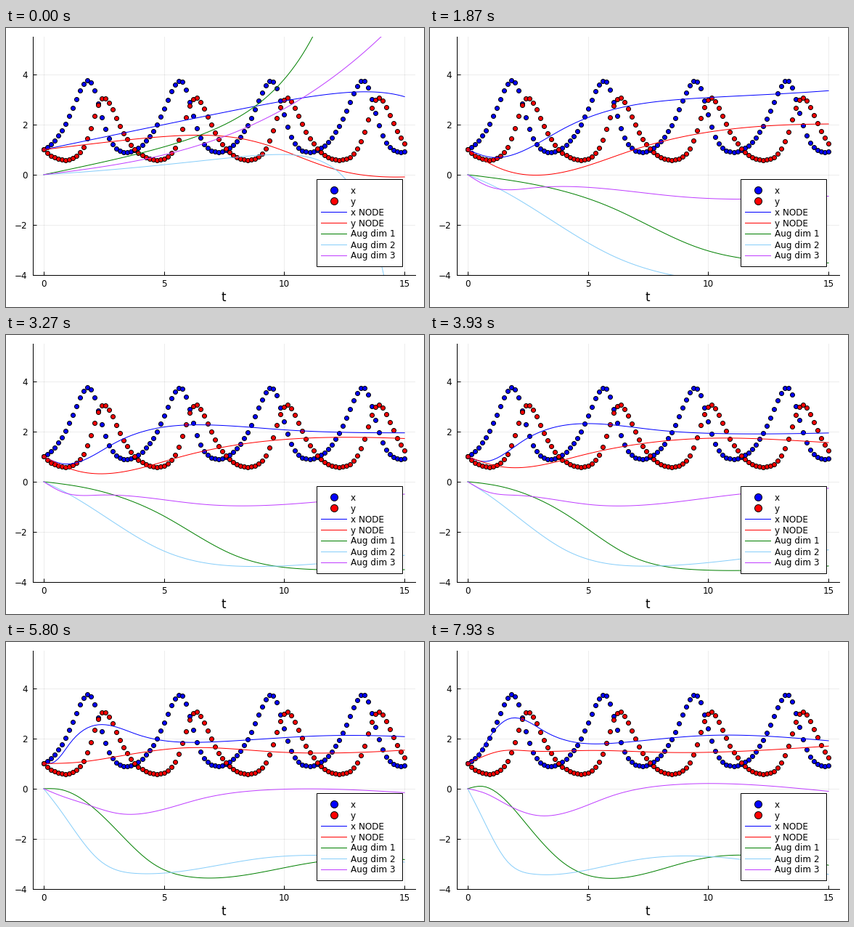
A matplotlib script that plays this animation: 576 by 384 pixels, repeating every 8 s.

```python
import numpy as np
import matplotlib.pyplot as plt
from matplotlib.animation import FuncAnimation
from matplotlib.patches import Rectangle

W, H, DPI = 576, 384, 100
FRAMES, LOOP = 120, 8000
PX = 72 / DPI  # one pixel in points

# Training phases, in frames: collapse, overshoot, slow refinement
COLLAPSED, PEAK, BLENDED, REFINE = 18, 23, 28, 39

plt.rcParams["font.family"] = "DejaVu Sans"
BLUE, RED, GREEN, SKY, PURPLE = "#0000ff", "#ff0000", "#008000", "#87cefa", "#bf3eff"
T = np.linspace(0, 15, 100)


def smooth(n, a, b):
    s = np.clip((n - a) / (b - a), 0, 1)
    return s * s * (3 - 2 * s)


def spline(x, y, q):
    """Natural cubic spline through (x, y), evaluated at q."""
    h, k = np.diff(x), len(x)
    a, r = np.eye(k), np.zeros(k)
    for i in range(1, k - 1):
        a[i, i - 1:i + 2] = h[i - 1], 2 * (h[i - 1] + h[i]), h[i]
        r[i] = 6 * ((y[i + 1] - y[i]) / h[i] - (y[i] - y[i - 1]) / h[i - 1])
    m = np.linalg.solve(a, r)
    i = np.clip(np.searchsorted(x, q, side="right") - 1, 0, k - 2)
    u, v, w = x[i + 1] - q, q - x[i], h[i]
    return ((m[i] * u ** 3 + m[i + 1] * v ** 3) / (6 * w)
            + (y[i] / w - m[i] * w / 6) * u + (y[i + 1] / w - m[i + 1] * w / 6) * v)


def training(untrained, decay, early, late, speed, push):
    """All frames of one curve.

    untrained: values before the first step
    decay:     (limit, slow size, slow rate, fast rate) of the collapsed curve
    early, late: key points (t, value) that slide during refinement
    speed:     how sharply the key points move towards t = 0
    push:      size of the passing overshoot at t = 15
    """
    start = round(untrained[0])
    limit, size, slow, fast = decay
    collapsed = (limit + size * np.exp(-slow * T)
                 + (start - limit - size) * np.exp(-fast * T))
    (t0, v0), (t1, v1) = np.transpose(early), np.transpose(late)
    frames = []
    for n in range(FRAMES):
        s = max(0, (n - REFINE) / (FRAMES - 1 - REFINE))
        t = t1 + (t0 - t1) * (1 - s) ** speed
        v = v0 + (v1 - v0) * s
        wave = spline(np.r_[0, t], np.r_[start, v], T)
        a, b = smooth(n, 0, COLLAPSED), smooth(n, COLLAPSED, BLENDED)
        swing = smooth(n, COLLAPSED, PEAK) * np.exp(-max(0, n - PEAK) / 6)
        first = untrained + (collapsed - untrained) * a
        frames.append(first + (wave - first) * b + push * swing * T / 15)
    return frames


def lotka_volterra(sub=20):
    def rate(u):
        x, y = u
        return np.array([1.5 * x - x * y, x * y - 2 * y])

    u, out, h = np.ones(2), [], (T[1] - T[0]) / sub
    for _ in T:
        out.append(u)
        for _ in range(sub):
            a = rate(u)
            b = rate(u + h / 2 * a)
            c = rate(u + h / 2 * b)
            d = rate(u + h * c)
            u = u + h / 6 * (a + 2 * b + 2 * c + d)
    return np.array(out).T


x_node = training(
    1 + .2 * T - 2.7e-4 * np.exp(.54 * T), (1.08, -1.3, .147, 1.3),
    [(.9, .62), (4, 1.47), (9.3, 2.17), (13.5, 2), (18, 1.92), (38, 2.1), (55, 2)],
    [(.45, 1.4), (.9, 2.05), (1.65, 2.77), (3.25, 2.26), (6.3, 1.83), (9.9, 2.12), (15, 1.91)],
    speed=3, push=3.2)
y_node = training(
    1 + .12 * T - 3.05 / (1 + np.exp(.65 * (10.55 - T))), (-.75, .885, .143, 1.3),
    [(1.1, .34), (7, .92), (15.5, 1.8), (25, 1.5), (36, 1.6)],
    [(1.4, 1.52), (2.6, 1.51), (5, 1.52), (8, 1.45), (15, 1.7)],
    speed=2.6, push=.5)
aug1 = training(
    .19 * T + .0158 * (np.exp(.48 * T) - 1), (-.8, .26, .2, 1.13),
    [(1.8, -.23), (6, -1.32), (9.5, -2.88), (14, -3.5), (30, -3.1), (45, -3)],
    [(.6, .1), (2.5, -1.48), (4, -2.97), (5.5, -3.55), (9.7, -2.79), (15, -3.05)],
    speed=2.7, push=0)
aug2 = training(
    .06 * T + .004 * T ** 2 - 6e-5 * np.exp(.81 * T), (-1.5, 2.72, .14, .367),
    [(1, -.33), (6, -2.7), (10.8, -3.35), (20.5, -2.7), (34, -3.2)],
    [(.5, -.95), (1.6, -2.85), (2.7, -3.4), (7, -2.84), (15, -3.42)],
    speed=2.1, push=-3)
aug3 = training(
    .12 * T + .0018 * T ** 2.9, (.25, -1.13, .145, 1.05),
    [(.8, -.44), (2.8, -.52), (8.9, -.88), (19, -.6), (30, -.35), (40, -.4)],
    [(.7, -.17), (1.6, -.62), (2.9, -1.07), (6, -.28), (8.5, .16), (15, -.1)],
    speed=3.5, push=0)

fig = plt.figure(figsize=(W / DPI, H / DPI), dpi=DPI, facecolor="white")
ax = fig.add_axes([37 / W, 44 / H, 527 / W, 328 / H])
ax.set(xlim=(-.45, 15.45), ylim=(-4, 5.5),
       xticks=[0, 5, 10, 15], yticks=[-4, -2, 0, 2, 4])
ax.set_axisbelow(True)
ax.grid(color="black", alpha=.07, lw=PX)
ax.spines[["top", "right"]].set_visible(False)
ax.spines[["left", "bottom"]].set_linewidth(PX)
ax.tick_params(direction="in", length=5 * PX, width=PX, labelsize=12 * PX)
ax.tick_params(axis="x", pad=6.5 * PX)
ax.tick_params(axis="y", pad=7.5 * PX)


def dots(axes, x, y, color, size):
    axes.plot(x, y, "o", ms=size * PX, mfc=color, mec="black", mew=PX, zorder=3)


for data, color in zip(lotka_volterra(), (BLUE, RED)):
    dots(ax, T, data, color, 6)

series = [("x NODE", BLUE, x_node), ("y NODE", RED, y_node),
          ("Aug dim 1", GREEN, aug1), ("Aug dim 2", SKY, aug2),
          ("Aug dim 3", PURPLE, aug3)]
lines = [ax.plot([], [], color=c, lw=PX, zorder=4)[0] for _, c, _ in series]

# Legend and axis label, laid out in pixels
page = fig.add_axes([0, 0, 1, 1], zorder=5)
page.set(xlim=(0, W), ylim=(H, 0))
page.axis("off")
page.text(300, 375.5, "t", size=16.5 * PX, ha="center", va="baseline")
page.add_patch(Rectangle((428, 208), 118, 120, fc="white", ec="black", lw=PX))
legend = [("x", BLUE), ("y", RED)] + [s[:2] for s in series]
for i, (name, color) in enumerate(legend):
    y = 223 + 15 * i
    if i < 2:
        dots(page, [451.5], [y], color, 10)
    else:
        page.plot([434, 469], [y, y], color=color, lw=PX)
    page.text(475, y + 4.5, name, size=12 * PX, va="baseline")


def draw(n):
    for line, (_, _, values) in zip(lines, series):
        line.set_data(T, values[n])
    return lines


anim = FuncAnimation(fig, draw, frames=FRAMES, interval=LOOP / FRAMES,
                     repeat=True, repeat_delay=0, blit=False)
plt.show()
```
